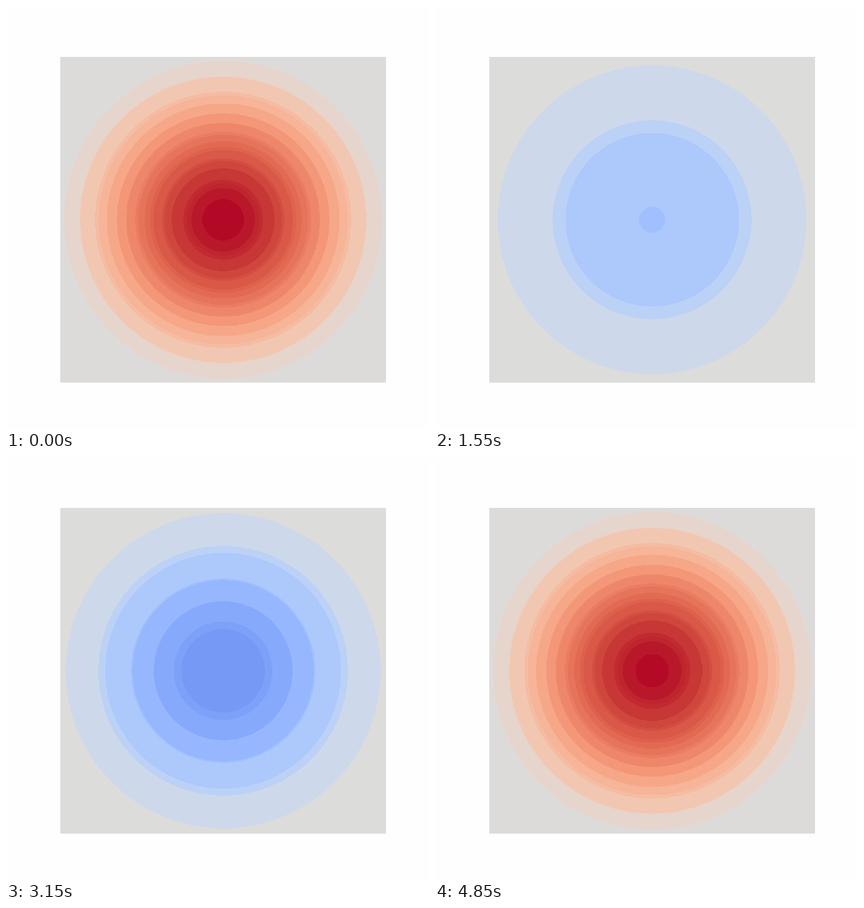
These frames come from a looping animation (748x748 px, 5 s). A matplotlib script:

```python
import math

import matplotlib
import matplotlib.pyplot as plt
import numpy as np
from matplotlib.animation import FuncAnimation
from matplotlib.colors import ListedColormap

SIZE, DPI = 748, 100
LEFT, BOTTOM, SIDE = 96, 82, 576
FRAMES, INTERVAL = 100, 50
GRID = 200
ROOT = 2.404825557695773  # first zero of the Bessel function J0

BASE = matplotlib.colormaps["coolwarm"](np.arange(256), bytes=True)[:, :3].astype(int)


def bessel_j0(x):
    angles = np.arange(64) * 2 * math.pi / 64
    return sum(np.cos(x * math.sin(a)) for a in angles) / len(angles)


def drum_mode():
    axis = np.linspace(-1, 1, GRID)
    x, y = np.meshgrid(axis, axis)
    r = np.hypot(x, y)
    return np.where(r <= 1, bessel_j0(ROOT * r), 0)


# Colours sharing a cell (3 bits red, 4 green, 3 blue) merge into one band.
CELLS = (BASE[:, 0] >> 5) * 128 + (BASE[:, 1] >> 4) * 8 + (BASE[:, 2] >> 5)
CELL_OF = np.unique(CELLS, return_inverse=True)[1]


def banded_map(z):
    index = np.clip(((z + 1) * 128).astype(int), 0, 255)
    weight = np.bincount(index.ravel(), minlength=256) + 1e-6
    total = np.bincount(CELL_OF, weight)
    means = [np.bincount(CELL_OF, weight * BASE[:, c]) / total for c in range(3)]
    colors = np.floor(np.stack(means, axis=1) + 1e-4)
    return ListedColormap(colors[CELL_OF] / 255)


mode = drum_mode()
fig = plt.figure(figsize=(SIZE / DPI, SIZE / DPI), dpi=DPI, facecolor="#fefefe")
ax = fig.add_axes([LEFT / SIZE, BOTTOM / SIZE, SIDE / SIZE, SIDE / SIZE])
ax.axis("off")
image = ax.imshow(mode, vmin=-1, vmax=1, cmap=banded_map(mode),
                  interpolation="hanning", interpolation_stage="data")


def draw(i):
    z = mode * math.cos(2 * math.pi * i / (FRAMES - 1))
    image.set_data(z)
    image.set_cmap(banded_map(z))
    return (image,)


anim = FuncAnimation(fig, draw, frames=FRAMES, interval=INTERVAL,
                     repeat=True, repeat_delay=0, blit=False)
plt.show()
```
